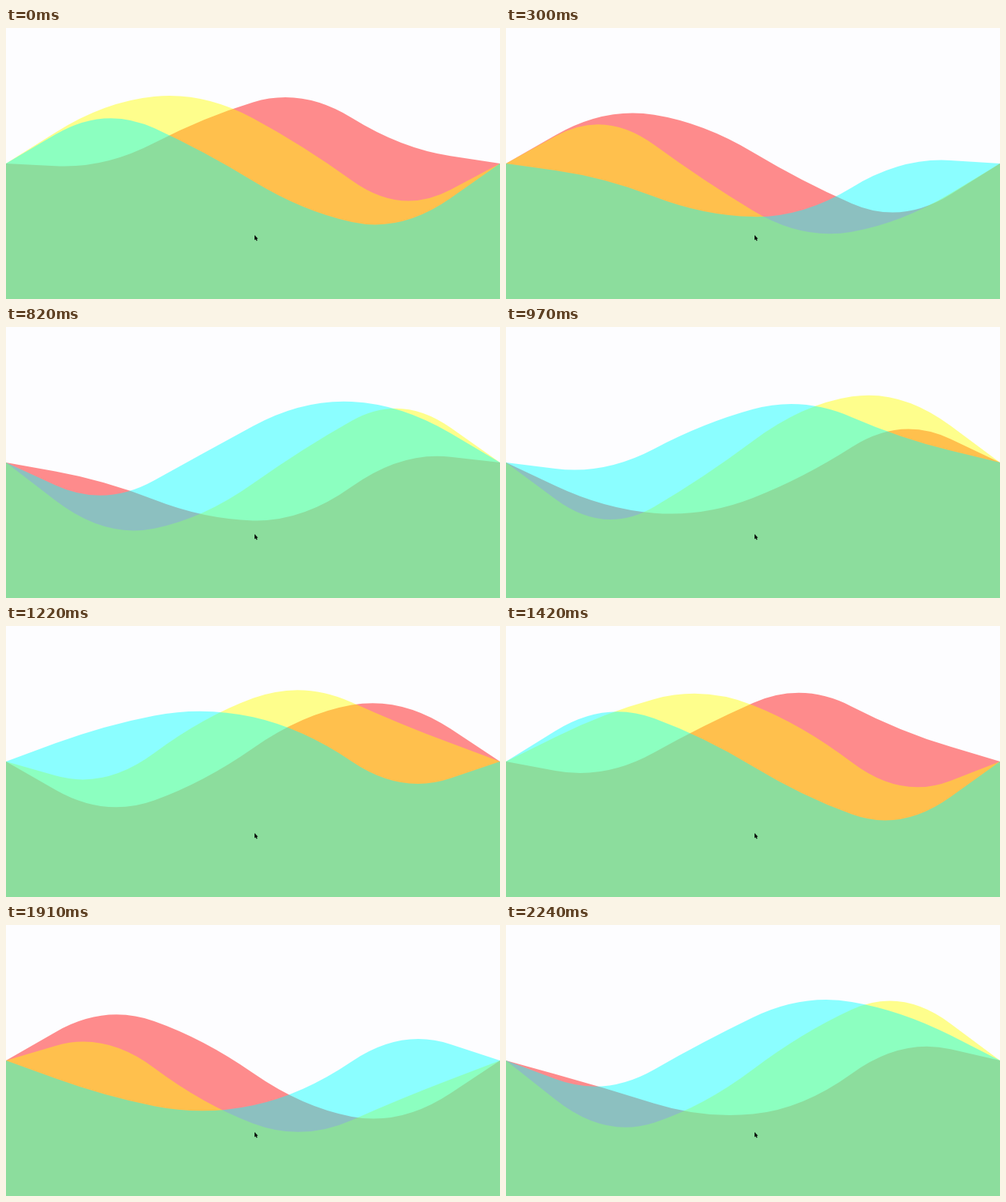
Write an HTML page with a canvas that moves like this. It is 640 px wide and 352 px high and loops after 2.26 s.

```html
<!DOCTYPE html>
<html lang="en">
<head>
<meta charset="utf-8">
<title>Waves</title>
<style>
  html, body { margin: 0; width: 100%; height: 100%; overflow: hidden; background: #fdfdff; }
  canvas { display: block; }
</style>
</head>
<body>
<canvas id="stage" width="640" height="352"></canvas>
<script>
const W = 640, H = 352, MID = H / 2, POINTS = 4, GAP = W / (POINTS + 1);
const LOOP = 2260, STEP = 0.2085, START = 3.053;
const ctx = document.getElementById('stage').getContext('2d');

// Translucent waves from back to front, each with the swing of its inner points.
const WAVES = [
  { color: '#f00', swings: [75, 76, 105, 85] },
  { color: '#ff0', swings: [102, 99, 106, 98] },
  { color: '#0ff', swings: [80, 72, 89, 92] }
];

// The motion advances in bursts of equal steps, with short rests between.
const BURSTS = [
  { from: 20, to: 500, steps: 11 },
  { from: 570, to: 1090, steps: 11 },
  { from: 1170, to: 1420, steps: 7 },
  { from: 1560, to: 2060, steps: 14 },
  { from: 2110, to: 2240, steps: 5 }
];

function stepsDone(ms) {
  return BURSTS.filter(b => ms >= b.from).reduce((sum, { from, to, steps }) => {
    const progress = Math.min(1, (ms - from) / (to - from));
    return sum + 1 + Math.round(progress * (steps - 1));
  }, 0);
}

function fillWave({ color, swings }, phase) {
  const ys = [MID, ...swings.map((a, i) => MID + a * Math.sin(phase + i)), MID];
  const between = i => (ys[i] + ys[i + 1]) / 2;
  ctx.beginPath();
  ctx.moveTo(0, H);
  ctx.lineTo(0, MID);
  ctx.lineTo(GAP / 2, between(0));
  for (let i = 1; i <= POINTS; i++) {
    ctx.quadraticCurveTo(i * GAP, ys[i], (i + 0.5) * GAP, between(i));
  }
  ctx.lineTo(W, MID);
  ctx.lineTo(W, H);
  ctx.fillStyle = color;
  ctx.fill();
}

const pointer = new Path2D('M322 269v6.5l1.5-1.2 1 2.2 1.2-.6-1-2.1h1.8z');

function draw(ms) {
  const phase = START + STEP * stepsDone(ms);
  ctx.globalAlpha = 1;
  ctx.fillStyle = '#fdfdff';
  ctx.fillRect(0, 0, W, H);
  ctx.globalAlpha = 0.45;
  WAVES.forEach((wave, j) => fillWave(wave, phase + j));
  ctx.globalAlpha = 1;
  ctx.fillStyle = '#000';
  ctx.fill(pointer);
}

function tick() {
  draw(performance.now() % LOOP);
  requestAnimationFrame(tick);
}
tick();
</script>
</body>
</html>
```
